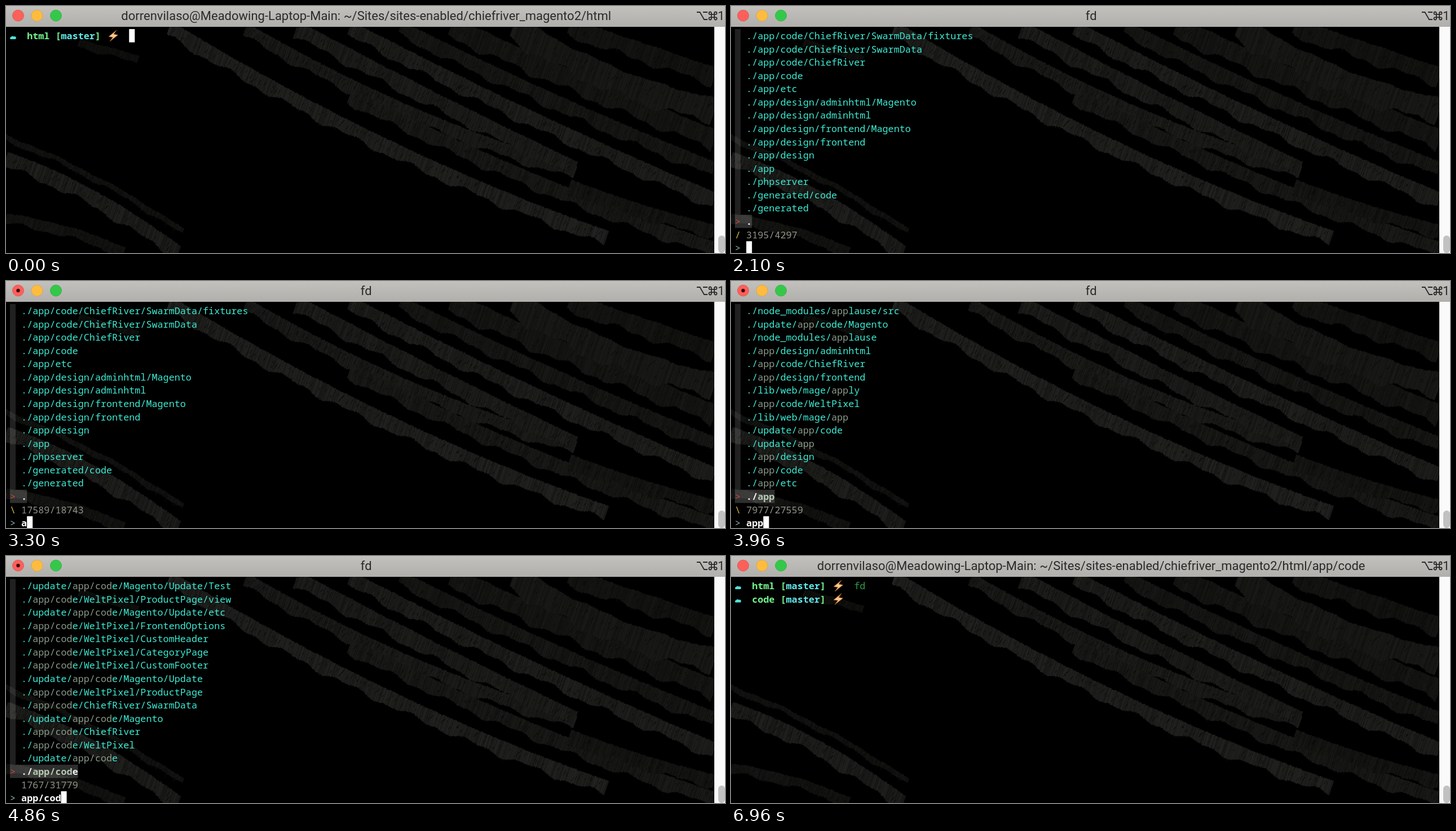
An HTML page with a canvas for the animation above (7020 ms loop, 1275 by 439 pixels).

```html
<!DOCTYPE html>
<html lang="en">
<head>
<meta charset="utf-8">
<title>Fuzzy directory search</title>
<style>
  html, body { margin: 0; width: 100%; height: 100%; overflow: hidden; background: #000; }
  canvas, svg { position: absolute; left: 0; top: 0; width: 1275px; height: 439px; }
  text { white-space: pre; }
  .mono { font: 16.77px "Noto Sans Mono", "DejaVu Sans Mono", monospace; }
  .bar { font: 22px Roboto, "Liberation Sans", sans-serif; fill: #2b2a29; }
  .b { font-weight: 700; }
</style>
</head>
<body>
<canvas id="rock" width="1275" height="439"></canvas>
<svg viewBox="0 0 1275 439">
  <defs>
    <linearGradient id="barFill" x2="0" y2="1">
      <stop stop-color="#c3c1be"/><stop offset="1" stop-color="#b1afac"/>
    </linearGradient>
    <g id="prompt">
      <path d="M8 59a2.2 2.2 0 0 1 1-4a3 3 0 0 1 5-.5a2.3 2.3 0 0 1 2.5 4.5z" fill="#4fe3da"/>
      <path d="M196 43L182 54.5L189.5 55.5L184 63L198.5 51.5L191 50Z" fill="#f9c98c" stroke="#a9571f" stroke-width=".8"/>
    </g>
  </defs>
  <g id="term" class="mono"></g>
  <rect width="1275" height="37" fill="url(#barFill)"/>
  <g id="lights" stroke-width=".7"></g>
  <circle id="busy" cx="21.5" cy="17" r="3.2" fill="#3d0504"/>
  <text id="title" class="bar" x="638.7" y="25" text-anchor="middle"></text>
  <g fill="none" stroke="#2b2a29" stroke-width="1.8">
    <path d="M1225 11h5.5l7.5 13h6M1236 11h8"/>
    <g id="command" transform="translate(1253.5 17.5)"></g>
  </g>
  <text class="bar" x="1262" y="25">1</text>
  <rect x="1256" y="37" width="19" height="402" fill="#fafafa"/>
  <rect x="1263" y="408" width="12" height="31" rx="6" fill="#c1c1c1"/>
</svg>
<script>
const LOOP = 7020, STEP = 60, CELL = 10.06, ROW = 23.57, LEFT = 7, TOP = 41;
const el = id => document.getElementById(id);

const HOST = 'dorrenvilaso@Meadowing-Laptop-Main: ~/Sites/sites-enabled/chiefriver_magento2/html';
const RUN = 1620, READY = 1740, SETTLED = 4285, DONE = 5580, LAST_ROW = 14;
const KEYS = [[3240, 'a'], [3420, 'p'], [3600, 'p'], [4080, '/'], [4320, 'c'], [4560, 'o'], [4740, 'd'], [4920, 'e']];
const SCANNED = [[READY, 0], [2100, 4297], [3300, 18743], [3960, 27559], [SETTLED, 31779]];
const SHARE = [1, 0.93, 0.34, 7977 / 27559, 0.17, 0.09, 0.06, 1767 / 31779, 0.0553];

const paths = lines => lines.trim().split(/\s+/).map(p => './' + p);
const ALL = paths(`
  app/code/ChiefRiver/SwarmData/fixtures app/code/ChiefRiver/SwarmData app/code/ChiefRiver
  app/code app/etc app/design/adminhtml/Magento app/design/adminhtml
  app/design/frontend/Magento app/design/frontend app/design app phpserver
  generated/code generated`).concat('.');
const APP = paths(`
  node_modules/applause/src update/app/code/Magento node_modules/applause
  app/design/adminhtml app/code/ChiefRiver app/design/frontend lib/web/mage/apply
  app/code/WeltPixel lib/web/mage/app update/app/code update/app app/design
  app/code app/etc app`);
const CODE = paths(`
  update/app/code/Magento/Update/Test app/code/WeltPixel/ProductPage/view
  update/app/code/Magento/Update/etc app/code/WeltPixel/FrontendOptions
  app/code/WeltPixel/CustomHeader app/code/WeltPixel/CategoryPage
  app/code/WeltPixel/CustomFooter update/app/code/Magento/Update
  app/code/WeltPixel/ProductPage app/code/ChiefRiver/SwarmData
  update/app/code/Magento app/code/ChiefRiver app/code/WeltPixel
  update/app/code app/code`);

const typed = t => KEYS.filter(k => t >= k[0]).map(k => k[1]).join('');

function scanned(t) {
  if (t <= READY) return 0;
  for (let i = 1; i < SCANNED.length; i++) {
    const [t0, n0] = SCANNED[i - 1], [t1, n1] = SCANNED[i];
    if (t <= t1) return Math.round(n0 + (n1 - n0) * (t - t0) / (t1 - t0));
  }
  return SCANNED[SCANNED.length - 1][1];
}

const x = col => LEFT + col * CELL;
const span = (s, fill) => `<tspan fill="${fill}">${s.replace('>', '&gt;')}</tspan>`;
const text = (col, row, body, cls = '') =>
  `<text class="${cls}" x="${x(col)}" y="${59 + row * ROW}">${body}</text>`;
const block = (col, row, cols, rows, fill) =>
  `<rect x="${x(col)}" y="${TOP + row * ROW}" width="${cols * CELL}" height="${rows * ROW}" fill="${fill}"/>`;
const cursor = (col, row) => block(col, row, 1, 1, '#fff');

function marked(path, query, plain, match) {
  const at = path.indexOf(query), end = at + query.length;
  return span(path.slice(0, at), plain) + span(path.slice(at, end), match) + span(path.slice(end), plain);
}

function prompt(dir, row) {
  return `<use href="#prompt" y="${row * ROW}"/>` +
    text(3, row, span(dir + ' [', '#72f58c') + span('master', '#62e9ea') + span(']', '#72f58c'), 'b');
}

function shell(t) {
  const command = t >= DONE ? 'fd' : t < 780 ? '' : t < 840 ? 'f' : 'fd';
  let out = prompt('html', 0) + text(21, 0, span(command, '#2f9e44'));
  if (t >= DONE) out += prompt('code', 1);
  else if (t < 300 || t >= 780) out += cursor(21 + command.length, 0);
  return out;
}

function finder(t) {
  const query = typed(t), shown = typed(t - 120), total = scanned(t);
  const list = shown.length > 3 ? CODE : shown ? APP : ALL;
  const matched = shown ? Math.round(total * SHARE[shown.length])
    : Math.max(0, total - Math.round(1102 + (t - 2100) * 52 / 1200));
  let out = '';
  if (t >= READY) {
    const picked = list[LAST_ROW];
    out += block(0, 0, 1, LAST_ROW, 'rgba(255,255,255,.13)') +
      block(0, LAST_ROW, 2 + picked.length, 1, 'rgba(255,255,255,.18)');
    list.slice(0, LAST_ROW).forEach((p, i) => out += text(2, i, marked(p, shown, '#3debd3', '#8a9a8a')));
    out += text(0, LAST_ROW, span('>', '#d0473c')) +
      text(2, LAST_ROW, marked(picked, shown, '#f4f4f4', '#b5c9b3'), 'b');
  }
  if (t < SETTLED) out += text(0, 15, span('-\\|/'[(Math.floor((t + 60) / 200) + 1) % 4], '#d3bd45'));
  return out + text(2, 15, span(matched + '/' + total, '#93938a')) +
    text(0, 16, span('>', '#93b3b3')) + text(2, 16, span(query, '#fff'), 'b') +
    cursor(2 + query.length, 16);
}

function render(t) {
  const running = t >= RUN && t < DONE;
  el('title').textContent = running ? 'fd' : HOST + (t >= DONE ? '/app/code' : '');
  el('busy').style.display = t >= 2640 && t < 6300 ? '' : 'none';
  el('term').innerHTML = running ? finder(t) : shell(t);
}

function paintRock() {
  const ctx = el('rock').getContext('2d');
  let seed = 41;
  const rnd = () => (seed = (seed * 16807) % 2147483647) / 2147483647;
  const line = (x0, y0, x1, y1, tone, width) => {
    ctx.strokeStyle = `rgb(${tone},${tone},${tone - 2})`;
    ctx.lineWidth = width;
    ctx.beginPath();
    ctx.moveTo(x0, y0);
    ctx.lineTo(x1, y1);
    ctx.stroke();
  };

  // One layer of rock, sagging by `bend` halfway between its ends.
  function stratum(tone, width, x0, y0, x1, y1, bend) {
    const phase = rnd() * 9;
    for (let px = x0; px < x1; px += 1.5) {
      const u = (px - x0) / (x1 - x0);
      const wave = Math.sin(px / 17 + phase) + Math.sin(px / 7.3 + phase * 2) * 0.6;
      const half = width * (0.45 + 0.07 * wave) + rnd() * 2;
      const py = y0 + (y1 - y0) * u + bend * 4 * u * (1 - u) + wave * 1.8;
      line(px + half * 0.35, py - half, px - half * 0.35, py + half, Math.round(tone * (0.75 + rnd() * 0.4)), 2);
      if (rnd() < 0.4) {
        const cy = py + (rnd() - 0.5) * half * 1.8, len = 2 + rnd() * 6;
        line(px, cy, px - len * 0.7, cy + len, Math.round(6 + rnd() * 6), 1);
      }
    }
  }

  ctx.fillRect(0, 0, 1275, 439);
  stratum(31, 24, 290, 40, 1065, 412, 25);
  stratum(26, 22, 425, 42, 1010, 295, 22);
  stratum(24, 24, 610, 160, 1256, 432, 14);
  stratum(27, 26, 515, 40, 1010, 290, 4);
  stratum(29, 25, 610, 40, 1256, 345, 8);
  stratum(22, 24, 700, 40, 1256, 290, 7);
  stratum(21, 34, 790, 38, 1256, 237, 3);
  stratum(24, 42, 900, 38, 1256, 184, 20);
  stratum(19, 30, 1000, 38, 1256, 125, 0);
  stratum(20, 22, 1000, 320, 1256, 400, 5);
  stratum(29, 25, 0, 272, 305, 439, -15);
  stratum(18, 8, 0, 235, 315, 402, -12);
  stratum(19, 16, 0, 378, 210, 438, -8);
  stratum(15, 12, 130, 65, 235, 96, 0);
}

el('lights').innerHTML = [['#fc605b', '#df4a43'], ['#fdbc40', '#dea133'], ['#34c84a', '#27a933']]
  .map(([fill, edge], i) => `<circle cx="${21.5 + i * 33.5}" cy="17" r="10" fill="${fill}" stroke="${edge}"/>`).join('');
el('command').innerHTML = '<path d="M-2.6 -2.6H2.6V2.6H-2.6Z"/>' + [0, 90, 180, 270].map(a =>
  `<path d="M-2.6 -2.6h-2.2a2.2 2.2 0 1 1 2.2 -2.2z" transform="rotate(${a})"/>`).join('');
paintRock();

const start = performance.now();
let last = -1;
function tick() {
  const now = (performance.now() - start) % LOOP;
  const t = Math.floor(now / STEP) * STEP;
  if (t !== last) render(last = t);
  requestAnimationFrame(tick);
}
tick();
</script>
</body>
</html>
```
